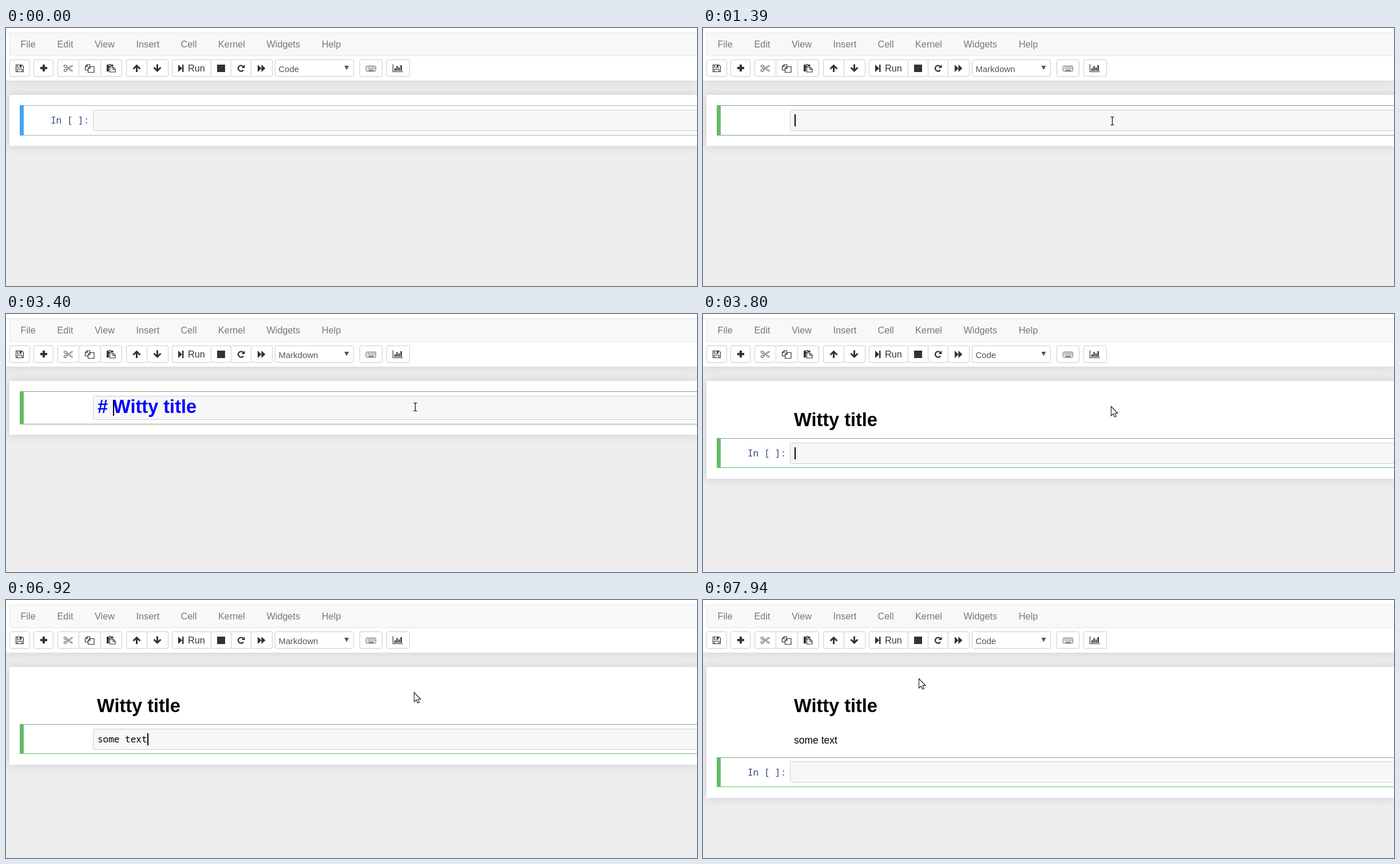
Animation of 1208x451 px, one loop 8000 ms. Source, as an HTML page:

```html
<!DOCTYPE html>
<html lang="en">
<head>
<meta charset="utf-8">
<title>Notebook</title>
<style>
  html, body { margin: 0; width: 100%; height: 100%; overflow: hidden; background: #eee; }
  #stage { position: relative; width: 100%; height: 100%; overflow: hidden; contain: strict; }
  .panel { position: absolute; right: 0; background: #fff; box-shadow: 0 0 15px 1px rgba(87, 87, 87, .2); }
  #header { left: 0; top: 0; height: 92px; }
  #page { left: 6px; top: 117px; }
  svg { position: absolute; left: 0; top: 0; width: 100%; height: 100%; overflow: hidden; }
  text { white-space: pre; font-family: "Liberation Sans", Arial, sans-serif; font-size: 16.25px; fill: #333; }
  #menu text { fill: #777; }
  #menu rect { fill: #f7f8f8; stroke: #e7e7e7; }
  #buttons rect { fill: #fff; stroke: #ccc; }
  #icons { fill: #333; }
  #icons .line { fill: none; stroke: #333; stroke-width: 1.2; }
  #icons .thin { stroke: #555; stroke-width: 1; }
  #kind { font-size: 15px; fill: #555; }
  #prompt, #code { font-family: "Noto Sans Mono", monospace; font-size: 16.04px; }
  #prompt { fill: #26477f; }
  #code { fill: #000; }
  #code.heading { font: bold 32.5px "Liberation Sans", Arial, sans-serif; fill: #00f; }
  #title { font-size: 32.5px; font-weight: bold; fill: #000; }
  #note { font-size: 17.5px; fill: #000; }
</style>
</head>
<body>
<div id="stage">
<div id="header" class="panel"></div>
<div id="page" class="panel"></div>
<svg viewBox="0 0 1208 451">
  <g id="menu">
    <path d="M0 8.500h6" stroke="#e7e7e7"/>
    <rect x="6.5" y="8.5" width="1210" height="40" rx="2"/>
  </g>
  <g id="buttons"></g>
  <g id="icons">
    <path class="line" d="M17.5 64.500h10.500l2.500 2.500v9.500h-13zM20 64.500v4.500h6.500v-4.500M20 76.500v-4.500h8v4.500"/>
    <path d="M24 65h2v3h-2zM64 64h4v4h4v4h-4v4h-4v-4h-4v-4h4z"/>
    <g class="line thin">
      <ellipse cx="104" cy="67" rx="2.800" ry="1.900" transform="rotate(25 104 67)"/>
      <ellipse cx="104" cy="74" rx="2.800" ry="1.900" transform="rotate(-25 104 74)"/>
      <path d="M106.500 68.500l4 2 6-4.500-2-.5-8 5.500M106.500 72.500l4-2 6 4.500-2 .5-5-3"/>
    </g>
    <path class="line" d="M146.500 67.500h4.500M138.500 67.500l3.500-3.500h4.500v4M142 64v3.500h-3.500v6h5M143.500 70.500l3-3h7.500v10h-10.500zM147 67.500v3.500h-3.500"/>
    <path d="M176 64h3.500v-1h4.500v1h3.500v3h-5.500l-2 2v7h-4z"/>
    <path d="M179 64.500h5v1.200h-5z" fill="#fff"/>
    <path class="line" d="M181.500 68.500h6l3.500 3.500v5h-9.500zM187 68.500v4h4"/>
    <path id="up" d="M228.500 63.500l7 7-2 2-3.500-3.300v7.800h-3v-7.800l-3.500 3.300-2-2z"/>
    <use href="#up" transform="rotate(180 246.500 70.250)"/>
    <path d="M301 64l7 6.500-7 6.500zM308 64h2.500v13h-2.500zM369 64h14v13h-14z"/>
    <path d="M415 73.500a5 5 0 1 1-.5-6.500" fill="none" stroke="#333" stroke-width="2.300"/>
    <path d="M417.500 64v6h-6zM440 64l6.500 6.500-6.500 6.500zM446.500 64l7 6.500-7 6.500z"/>
    <path d="M591.500 66h8l-4 7.500z" fill="#555"/>
    <rect class="line thin" x="629.500" y="66.500" width="17" height="9" rx="1"/>
    <path d="M632 69h13M632 71.500h13" stroke="#555" stroke-width="1.300" stroke-dasharray="1.300 1"/>
    <path d="M634 74h8.500" stroke="#555" stroke-width="1.300"/>
    <path class="line" d="M676.500 63.500v13h17.500"/>
    <path d="M679 70.500h2.500v4.500h-2.500zM682.500 66.500h2.300v8.500h-2.300zM686 69h2.300v6h-2.300zM689.500 65h2.500v10h-2.500z"/>
  </g>
  <text x="318" y="76">Run</text>
  <text id="kind" x="476.500" y="76.500"></text>

  <text id="title" x="159" y="196">Witty title</text>
  <text id="note" x="159" y="251">some text</text>
  <g id="cell">
    <rect id="topLine" x="24" width="1184" height="1"/>
    <rect id="bottomLine" x="24" width="1184" height="1"/>
    <rect id="bar" x="24" width="7"/>
    <rect id="box" x="152.500" width="1060" rx="2" fill="#f7f7f7" stroke="#cfcfcf"/>
    <text id="prompt" x="78" y="32">In [ ]:</text>
    <text id="code" x="160"></text>
    <rect id="caret" width="2"/>
  </g>
  <g id="mouse">
    <path id="arrow" d="M.5 0v16.500l3.700-3.500 2.500 5.500 2.700-1.200-2.500-5.300h5z" fill="#fff" stroke="#1a1a2e" stroke-width="1.100"/>
    <path id="beam" d="M-3 -7h2l1 1 1-1h2M0 -6v12M-3 7h2l1-1 1 1h2" fill="none" stroke="#000" stroke-width="1.100"/>
  </g>
</svg>
</div>
<script>
const LOOP = 8000, CHAR = 9.624;
const el = {};
document.querySelectorAll('[id]').forEach(node => el[node.id] = node);

function add(parent, name, attrs, content = '') {
  const node = document.createElementNS('http://www.w3.org/2000/svg', name);
  set(node, attrs);
  node.textContent = content;
  parent.append(node);
}
function set(node, attrs) {
  for (const key in attrs) node.setAttribute(key, attrs[key]);
}
function show(node, visible) {
  node.style.display = visible ? '' : 'none';
}

const menu = { File: 25.5, Edit: 89.5, View: 155, Insert: 227.5, Cell: 305.5, Kernel: 371, Widgets: 455.5, Help: 552 };
for (const name in menu) add(el.menu, 'text', { x: menu[name], y: 34 }, name);

// Each group of joined buttons is listed by its edges.
const groups = [[6, 41], [48, 82], [90, 127, 165, 202], [210, 246, 283],
  [290, 358, 393, 428, 465], [470, 607], [618, 657], [665, 705]];
for (const edges of groups)
  for (let i = 1; i < edges.length; i++)
    add(el.buttons, 'rect', { x: edges[i - 1] + .5, y: 55.5, width: edges[i] - edges[i - 1], height: 29, rx: 2 });

const typing = (word, times, start = 0) =>
  times.map((time, i) => [time, { text: word.slice(0, start + i + 1), caret: start + i + 1, blink: true }]);

const initial = { y: 135, inset: 8, bottom: 206, edit: false, markdown: false, heading: false,
  text: '', caret: 0, blink: true, rendered: 0 };
const newCell = { edit: true, markdown: false, heading: false, text: '', caret: 0, blink: true };

const steps = [
  [850, { edit: true }],
  [1010, { edit: false }],
  [1150, { markdown: true }],
  [1390, { edit: true }],
  ...typing('Witty title', [1620, 1700, 1780, 1860, 2000, 2160, 2400, 2470, 2540]),
  [2780, { text: 'Witty title', caret: 11 }],
  [3020, { caret: 0 }],
  [3340, { text: '#Witty title', caret: 1 }],
  [3400, { text: '# Witty title', heading: true, bottom: 211 }],
  [3800, { ...newCell, y: 217, bottom: 288, rendered: 1 }],
  [4260, { blink: false }],
  [4820, { edit: false, markdown: true }],
  [4900, { edit: true, blink: true }],
  [5440, { blink: false }],
  [5980, { blink: true }],
  ...typing('some text', Array.from({ length: 7 }, (_, i) => 6140 + i * 76.6)),
  ...typing('some text', [6760, 6920], 7),
  [7380, { ...newCell, y: 275, inset: 7, bottom: 346, rendered: 2 }],
  [7860, { blink: false }]
];

function drawMouse(t) {
  let x = 715, y = 162.5;
  if (t < 690) {
    const rest = (1 - Math.floor((t - 70) / 77.5) / 8) ** 2;
    x += 323 * rest;
    y += 270 * rest;
  }
  if (t >= 3800) [x, y] = t < 7940 ? [713, 161.5] : [377, 137.5];
  const beam = t < 3800 && y < 180;
  if (beam) x += .5;
  show(el.mouse, t >= 70);
  show(el.beam, beam);
  show(el.arrow, !beam);
  set(el.mouse, { transform: `translate(${x} ${y})` });
}

function draw(t) {
  const s = Object.assign({}, initial, ...steps.filter(([time]) => time <= t).map(([, change]) => change));
  const height = s.heading ? 58 : s.rendered ? 52 : 53;
  const lineColor = s.edit ? '#7ba77f' : '#a2b3b5';
  el.page.style.height = s.bottom - 117 + 'px';
  el.kind.textContent = s.markdown ? 'Markdown' : 'Code';
  show(el.title, s.rendered > 0);
  show(el.note, s.rendered > 1);

  set(el.cell, { transform: `translate(0 ${s.y})` });
  set(el.bar, { height, fill: s.edit ? '#66bb6a' : '#42a5f5' });
  set(el.topLine, { fill: lineColor });
  set(el.bottomLine, { y: height - 1, fill: s.edit && s.rendered ? '#66bb6a' : lineColor });
  set(el.box, { y: s.inset + .5, height: s.heading ? 41 : 36 });
  show(el.prompt, !s.markdown);

  el.code.textContent = s.text;
  el.code.classList.toggle('heading', s.heading);
  set(el.code, { y: s.heading ? 38 : 32 });
  show(el.caret, s.edit && s.blink);
  set(el.caret, s.heading
    ? { x: 187, y: 15, height: 28 }
    : { x: Math.round(160 + s.caret * CHAR), y: 16, height: 21 });
  drawMouse(t);
}

function frame(now) {
  draw(now % LOOP);
  requestAnimationFrame(frame);
}
draw(0);
requestAnimationFrame(frame);
</script>
</body>
</html>
```
